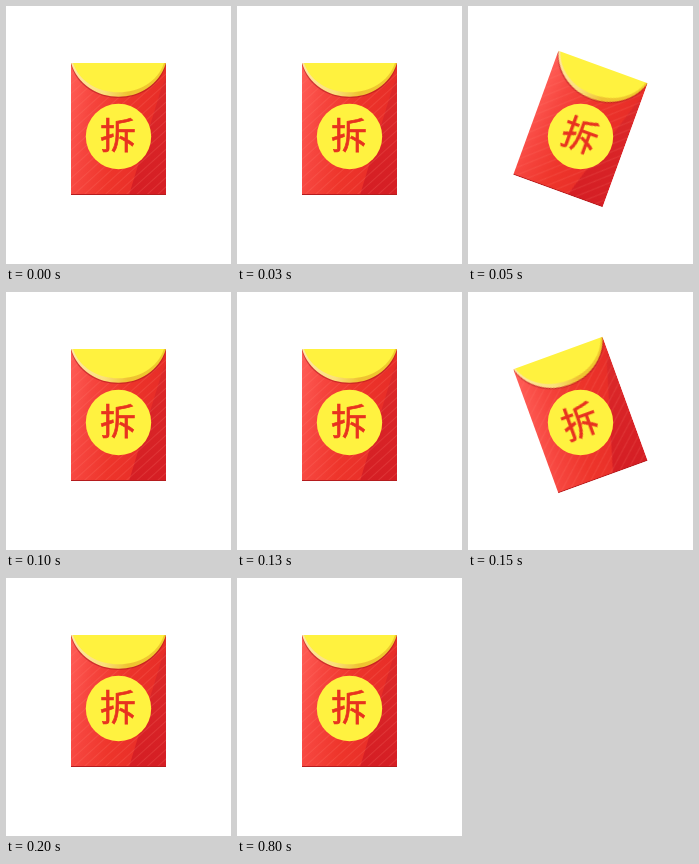
Animation of 225x258 px, one loop 1.2 s. Source, as an HTML page:

```html
<!DOCTYPE html>
<html lang="zh-CN">
<head>
<meta charset="utf-8">
<title>红包</title>
<style>
  html, body { margin: 0; width: 100%; height: 100%; overflow: hidden; background: #fff; }
  svg { display: block; width: 225px; height: 258px; }
  #packet { transform-origin: 112.5px 123px; }
  #label { transform-origin: 112.5px 130px; }
  text { font: 500 36px "Noto Sans CJK SC", "Noto Sans CJK", sans-serif; }
</style>
</head>
<body>
<svg viewBox="0 0 225 258">
  <defs>
    <linearGradient id="red" x1="0" y1="0.1" x2="1" y2="0.35">
      <stop offset="0" stop-color="#ff5c55"/>
      <stop offset="0.25" stop-color="#f6453e"/>
      <stop offset="0.55" stop-color="#ee352b"/>
      <stop offset="1" stop-color="#e62c27"/>
    </linearGradient>
    <linearGradient id="facet" x1="0" y1="0" x2="0" y2="1">
      <stop offset="0" stop-color="#dc2a2a"/>
      <stop offset="1" stop-color="#d51e24"/>
    </linearGradient>
    <linearGradient id="rim">
      <stop offset="0" stop-color="#ffe6a2"/>
      <stop offset="0.35" stop-color="#fbe07a"/>
      <stop offset="0.6" stop-color="#efc232"/>
      <stop offset="1" stop-color="#f0cc2c"/>
    </linearGradient>
    <pattern id="hatch" width="7" height="7" patternUnits="userSpaceOnUse" patternTransform="rotate(-42)">
      <path d="M0 3.5H7" stroke="#ff8478" stroke-width="1" opacity="0.2"/>
    </pattern>
    <clipPath id="body"><rect x="65" y="57" width="95" height="132"/></clipPath>
  </defs>
  <g id="packet">
    <g clip-path="url(#body)">
      <rect x="65" y="57" width="95" height="132" fill="url(#red)"/>
      <path d="M123 189L156 80L160 72V189Z" fill="url(#facet)"/>
      <rect x="65" y="57" width="95" height="132" fill="url(#hatch)"/>
      <path d="M65 59C78 103 147 103 160 59V57H65Z" fill="#a8181a" opacity="0.5"/>
      <path d="M65 57C79 102 146 102 160 57Z" fill="url(#rim)"/>
      <path d="M67 57C80 96 145 96 158 57Z" fill="#fff23f"/>
      <path d="M65 188.5H160" stroke="#b51c1e"/>
    </g>
  </g>
  <circle cx="112.5" cy="130.5" r="32.7" fill="#fff240"/>
  <g id="label">
    <text x="112" y="143" text-anchor="middle" fill="#e8321f" stroke="#e8321f" stroke-width="0.7">拆</text>
  </g>
</svg>
<script>
  const LOOP = 1200;
  const STEP = 50;
  const angles = [0, 20, 0, -20, 0];

  const shake = angles.map((angle, i) => ({
    offset: i * STEP / LOOP,
    transform: `rotate(${angle}deg)`,
    easing: "step-end"
  }));
  shake.push({ offset: 1, transform: "rotate(0deg)" });

  for (const id of ["packet", "label"]) {
    document.getElementById(id).animate(shake, { duration: LOOP, iterations: Infinity });
  }
</script>
</body>
</html>
```
